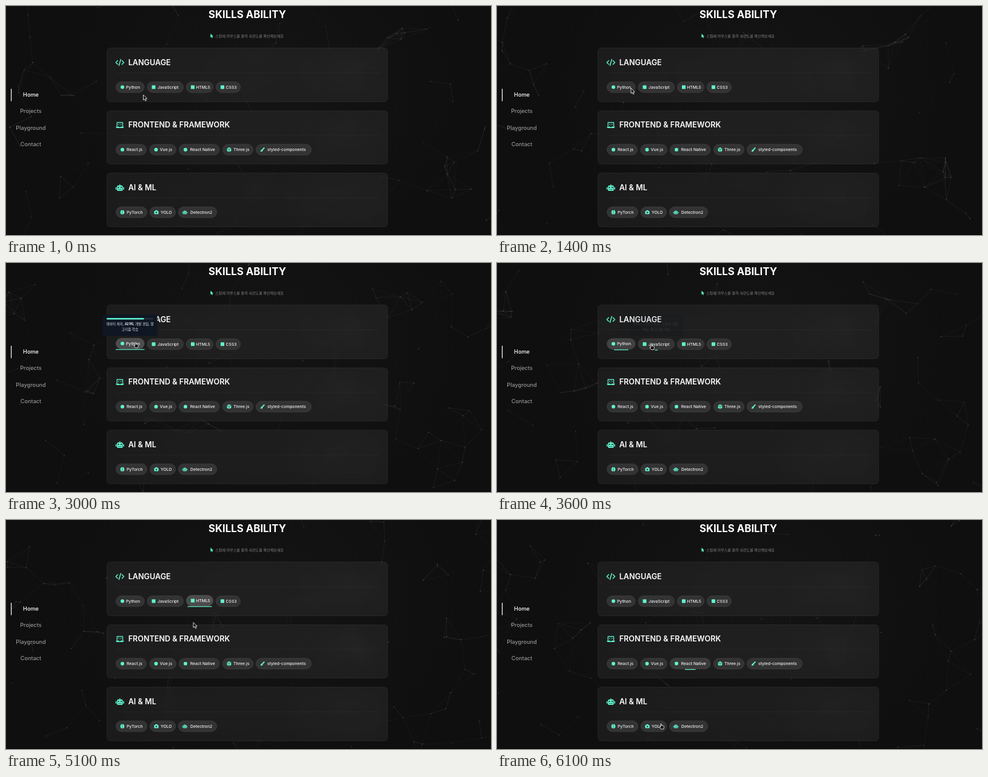
Write an HTML page with a canvas that moves like this. It is 800 by 379 pixels and loops after 6200 ms.

```html
<!DOCTYPE html>
<html lang="ko">
<head>
<meta charset="utf-8">
<title>Skills</title>
<style>
  html, body { margin: 0; width: 100%; height: 100%; overflow: hidden; background: #0f0f0f; }
  #stage {
    position: relative; width: 800px; height: 379px; overflow: hidden;
    background: radial-gradient(ellipse 340px 300px at 420px 140px, #141414, #0f0f0f);
  }
  canvas, svg { position: absolute; left: 0; top: 0; }
  .card {
    position: absolute; left: 166px; width: 464px; height: 89.5px; box-sizing: border-box;
    border: 1px solid rgba(255, 255, 255, .035); border-radius: 6px;
    background:
      radial-gradient(ellipse 120px 80px at 400px 40px, rgba(255, 255, 255, .02), transparent),
      rgba(255, 255, 255, .052);
    backdrop-filter: blur(9px);
  }
  text { font-family: Inter, sans-serif; fill: #fff; }
  .title { font-size: 16.8px; font-weight: 700; text-anchor: middle; }
  .head { font-size: 12.6px; font-weight: 600; }
  .skill { font-size: 6.8px; font-weight: 500; fill: #f2f2f2; }
  .nav { font-size: 9.15px; font-weight: 500; text-anchor: middle; fill: #949494; }
  .nav.on { fill: #fff; }
  .ko { font-family: "Noto Sans CJK KR", "Noto Sans CJK", sans-serif; font-size: 6.05px; fill: #858585; }
  .tip text { font-family: "Noto Sans CJK KR", "Noto Sans CJK", sans-serif; font-size: 5.6px; font-weight: 500; text-anchor: middle; fill: #e4e8ee; }
  .tip .b { font-weight: 700; }
  .mint { fill: #5ff3cd; }
  .line { fill: none; stroke: #5ff3cd; stroke-linecap: round; stroke-linejoin: round; }
  .cut { fill: #262626; }
  .pointer { fill: #111; stroke: #fff; stroke-width: .8; stroke-linejoin: round; }
</style>
</head>
<body>
<div id="stage">
  <canvas id="net" width="800" height="379"></canvas>
  <div class="card" style="top:69px"></div>
  <div class="card" style="top:172.5px"></div>
  <div class="card" style="top:276px"></div>
  <svg id="ui" width="800" height="379" viewBox="0 0 800 379">
    <defs>
      <g id="code"><path class="line" stroke-width="1.5" d="M-3.6-3.1-6.6 0-3.6 3.1M3.6-3.1 6.6 0 3.6 3.1M1.4-5-1.4 5"/></g>
      <g id="laptop">
        <path class="line" stroke-width="1.3" d="M-4.7 1.6V-3.8Q-4.7-4.4-4.1-4.4H4.1Q4.7-4.4 4.7-3.8V1.6"/>
        <path class="line" stroke-width=".9" d="M-1.2-2.4-2.5-1.1-1.2.2M1.2-2.4 2.5-1.1 1.2.2"/>
        <path class="mint" d="M-6.6 2.6H-1.6Q-1.4 3.4-.8 3.4H.8Q1.4 3.4 1.6 2.6H6.6Q6.6 5 5 5H-5Q-6.6 5-6.6 2.6Z"/>
      </g>
      <g id="robot">
        <rect class="mint" x="-.7" y="-5.6" width="1.4" height="3" rx=".6"/>
        <rect class="mint" x="-4.7" y="-3.4" width="9.4" height="8.8" rx="1.5"/>
        <rect class="mint" x="-7" y="-.8" width="1.6" height="4.2" rx=".7"/>
        <rect class="mint" x="5.4" y="-.8" width="1.6" height="4.2" rx=".7"/>
        <circle class="cut" cx="-2.2" cy="-.3" r="1.1"/><circle class="cut" cx="2.2" cy="-.3" r="1.1"/>
        <path stroke="#262626" stroke-width="1.1" stroke-dasharray="1.4 .7" d="M-2.8 3.3H2.8"/>
      </g>
      <circle id="dot" class="mint" r="3"/>
      <rect id="box" class="mint" x="-3" y="-3" width="6" height="6"/>
      <g id="cube">
        <path class="mint" d="M0-3.7 3.4-2.3V2.2L0 3.7-3.4 2.2V-2.3Z"/>
        <path fill="none" stroke="#333" stroke-width=".7" d="M-3-1.8 0-.5 3-1.8M0-.5V3.4"/>
      </g>
      <g id="brush">
        <path class="line" stroke-width="1.9" d="M2.7-2.8-.2.3"/>
        <path class="mint" d="M-1.2-.3Q.7.3.6 1.7.2 3.5-3.5 3.4-2.7 2.6-2.7 1.3-2.4-.1-1.2-.3Z"/>
      </g>
      <g id="brain">
        <path class="mint" d="M-.3-3.4Q-2-4-2.4-2.4-3.5-1.7-3.1-.5-3.9.7-3 1.8-2.7 3.3-1.5 3.4-.6 4-.3 3.1Z"/>
        <path class="mint" d="M.3-3.4Q2-4 2.4-2.4 3.5-1.7 3.1-.5 3.9.7 3 1.8 2.7 3.3 1.5 3.4.6 4 .3 3.1Z"/>
      </g>
      <g id="camera">
        <path class="mint" d="M-2.9-2.1H-1.8L-1.3-3.2H1.3L1.8-2.1H2.9Q3.6-2.1 3.6-1.4V2.4Q3.6 3.1 2.9 3.1H-2.9Q-3.6 3.1-3.6 2.4V-1.4Q-3.6-2.1-2.9-2.1Z"/>
        <circle r="1.3" cy=".4" fill="#333"/>
      </g>
      <g id="bot"><use href="#robot" transform="scale(.6)"/></g>
    </defs>
    <text class="title" x="398" y="20">SKILLS ABILITY</text>
    <path class="mint" d="M337.4 45.8V52.4L339 51 340 53.2 341 52.7 340.1 50.6H342.2Z"/>
    <text class="ko" x="345.3" y="51.7">스킬에 마우스를 올려 숙련도를 확인해보세요</text>
    <rect x="8" y="137" width="1.2" height="20.5" fill="#fff"/>
    <rect y="378" width="800" height="1" fill="#050505"/>
    <g id="list"></g>
    <g id="tips"></g>
    <g id="cursor">
      <path id="arrow" class="pointer" d="M0 0V8.6L2 6.8 3.4 10 5 9.3 3.6 6.2H6.2Z"/>
      <path id="hand" class="pointer" d="M-.6.6Q.2-.4 1 .6V3.2Q1.8 2.5 2.5 3.4 3.4 2.9 4 3.8 5 3.6 5 4.8V6.4L4.2 9H.1L-2.3 5.6Q-2.3 4.4-1.3 4.8L-.6 5.6Z"/>
    </g>
  </svg>
</div>
<script>
const LOOP = 6200, STEP = 100, W = 800, H = 379;
const $ = id => document.getElementById(id);
const clamp = v => Math.max(0, Math.min(1, v));
const ease = v => v * v * (3 - 2 * v);

function el(tag, attrs, parent, text) {
  const n = document.createElementNS('http://www.w3.org/2000/svg', tag);
  for (const k in attrs) n.setAttribute(k, attrs[k]);
  if (text) n.textContent = text;
  parent.appendChild(n);
  return n;
}

// Each skill: label, icon, left, width, text left
const groups = [
  ['LANGUAGE', 'code', 69, [
    ['Python', 'dot', 181, 47.5, 198], ['JavaScript', 'box', 232.5, 60.5, 250],
    ['HTML5', 'box', 297, 45, 313.3], ['CSS3', 'box', 346, 41, 362.5]]],
  ['FRONTEND & FRAMEWORK', 'laptop', 172.5, [
    ['React.js', 'dot', 181, 51, 199], ['Vue.js', 'dot', 236.5, 44.5, 253.8],
    ['React Native', 'dot', 285, 67.5, 303.7], ['Three.js', 'cube', 357, 51, 375],
    ['styled-components', 'brush', 412, 92, 431]]],
  ['AI & ML', 'robot', 276, [
    ['PyTorch', 'brain', 181, 52, 199], ['YOLO', 'camera', 237, 43, 255],
    ['Detectron2', 'bot', 284, 64, 304]]]
];
const hovers = {
  'Python': [2350, 3450], 'JavaScript': [3550, 4480],
  'HTML5': [4600, 5040], 'React Native': [5420, 5900], 'YOLO': [6100, LOOP]
};
const active = [];

['Home', 'Projects', 'Playground', 'Contact'].forEach((name, i) =>
  el('text', { class: i ? 'nav' : 'nav on', x: 41, y: 150.2 + i * 27.2 }, $('list'), name));

for (const [name, icon, top, skills] of groups) {
  const list = $('list');
  el('use', { href: '#' + icon, x: 187.8, y: top + 24.5 }, list);
  el('text', { class: 'head', x: 201.7, y: top + 28.9 }, list, name);
  el('rect', { x: 181, y: top + 41, width: 435, height: .8, fill: '#fff', 'fill-opacity': .04 }, list);
  for (const [label, glyph, x, w, tx] of skills) {
    const y = top + 56, g = el('g', {}, list);
    const shape = { x: x + .4, y: y + .4, width: w - .8, height: 17.8, rx: 8.9 };
    el('rect', { ...shape, fill: '#333', stroke: '#414141', 'stroke-width': .8 }, g);
    const glow = el('rect', { ...shape, fill: '#fff', opacity: 0 }, g);
    el('use', { href: '#' + glyph, x: x + 11, y: y + 9.3 }, g);
    el('text', { class: 'skill', x: tx, y: y + 11.7 }, g, label);
    if (hovers[label]) {
      const bar = el('rect', { class: 'mint', y: y + 18.6, height: 1.2 }, g);
      active.push({ g, glow, bar, x, w, span: hovers[label] });
    }
  }
}

function addTip(cx, level, span, lines) {
  const g = el('g', { class: 'tip' }, $('tips')), left = cx - 38.5;
  el('rect', { x: cx - 45, y: 85.5, width: 90, height: 35, rx: 3, fill: '#0f1724' }, g);
  el('rect', { x: left, y: 91, width: 77, height: 2.6, rx: 1.3, fill: '#252d39' }, g);
  const fill = el('rect', { class: 'mint', x: left, y: 91, height: 2.6, rx: 1.3 }, g);
  lines.forEach((parts, i) => {
    const t = el('text', { x: cx, y: 103.4 + i * 9 }, g);
    parts.forEach((p, j) => el('tspan', j % 2 ? { class: 'b' } : {}, t, p));
  });
  return { g, fill, level, span };
}
const tips = [
  addTip(204.5, .8, hovers.Python, [['데이터 처리, ', 'AI/ML', ' 개발 경험, 알'], ['고리즘 학습']]),
  addTip(262.5, .6, hovers.JavaScript, [['ES6+, 비동기 처리, 모듈화 개발'], ['가능, 알고리즘 학습']])
];

// Cursor stops: time, x, y
const path = [
  [0, 226.5, 147], [500, 226, 146], [1200, 221, 136], [1400, 221, 136], [2100, 218.8, 137],
  [2700, 213.5, 131.5], [3300, 213, 131], [3700, 262, 135], [4300, 268.5, 136], [4450, 270, 136],
  [4700, 311, 136], [4950, 312, 139], [5100, 309, 169.5], [5450, 316, 234], [5800, 317, 239],
  [6050, 270.5, 337], [6200, 270, 337]
];
function cursorAt(t) {
  const i = path.findIndex(p => p[0] > t), a = path[i - 1], b = path[i];
  const k = ease((t - a[0]) / (b[0] - a[0]));
  return [a[1] + (b[1] - a[1]) * k, a[2] + (b[2] - a[2]) * k];
}

let seed = 27;
const rnd = () => (seed = (seed * 16807) % 2147483647) / 2147483647;
const PAD = 30, LINK = 58;
const dots = Array.from({ length: 125 }, () => {
  const dir = rnd() * Math.PI * 2, speed = 8 + rnd() * 36;
  return {
    x: rnd() * (W + 2 * PAD), y: rnd() * (H + 2 * PAD),
    vx: Math.cos(dir) * speed, vy: Math.sin(dir) * speed, a: .1 + rnd() * .22
  };
});
const wrap = (v, n) => ((v % n) + n) % n - PAD;
const ctx = $('net').getContext('2d');

function drawNet(s) {
  ctx.clearRect(0, 0, W, H);
  const pts = dots.map(d => [wrap(d.x + d.vx * s, W + 2 * PAD), wrap(d.y + d.vy * s, H + 2 * PAD), d.a]);
  ctx.lineWidth = .6;
  pts.forEach(([x, y, a], i) => {
    ctx.fillStyle = `rgba(255,255,255,${a})`;
    ctx.beginPath();
    ctx.arc(x, y, .75, 0, 7);
    ctx.fill();
    for (let j = 0; j < i; j++) {
      const [u, v] = pts[j], d = Math.hypot(x - u, y - v);
      if (d > LINK) continue;
      ctx.strokeStyle = `rgba(255,255,255,${.15 * Math.sqrt(1 - d / LINK)})`;
      ctx.beginPath();
      ctx.moveTo(x, y);
      ctx.lineTo(u, v);
      ctx.stroke();
    }
  });
}

const hold = (t, [from, to], rise, fall) => ease(clamp((t - from) / rise)) * (1 - ease(clamp((t - to) / fall)));

function render(t) {
  drawNet(t / 1000);
  for (const { g, glow, bar, x, w, span } of active) {
    const h = hold(t, span, 300, 300);
    g.setAttribute('transform', `translate(0 ${-h})`);
    glow.setAttribute('opacity', .13 * h);
    bar.setAttribute('x', x + w * (1 - h) / 2);
    bar.setAttribute('width', w * h);
  }
  for (const { g, fill, level, span } of tips) {
    g.setAttribute('opacity', hold(t, span, 250, 150));
    fill.setAttribute('width', 77 * level * ease(clamp((t - span[0]) / 550)));
  }
  const over = active.some(({ span }) => t >= span[0] && t < span[1]);
  $('hand').setAttribute('visibility', over ? 'visible' : 'hidden');
  $('arrow').setAttribute('visibility', over ? 'hidden' : 'visible');
  $('cursor').setAttribute('transform', `translate(${cursorAt(t)})`);
}

let last = -1;
function tick() {
  const t = Math.floor(performance.now() % LOOP / STEP) * STEP;
  if (t !== last) render(last = t);
  requestAnimationFrame(tick);
}
tick();
</script>
</body>
</html>
```
